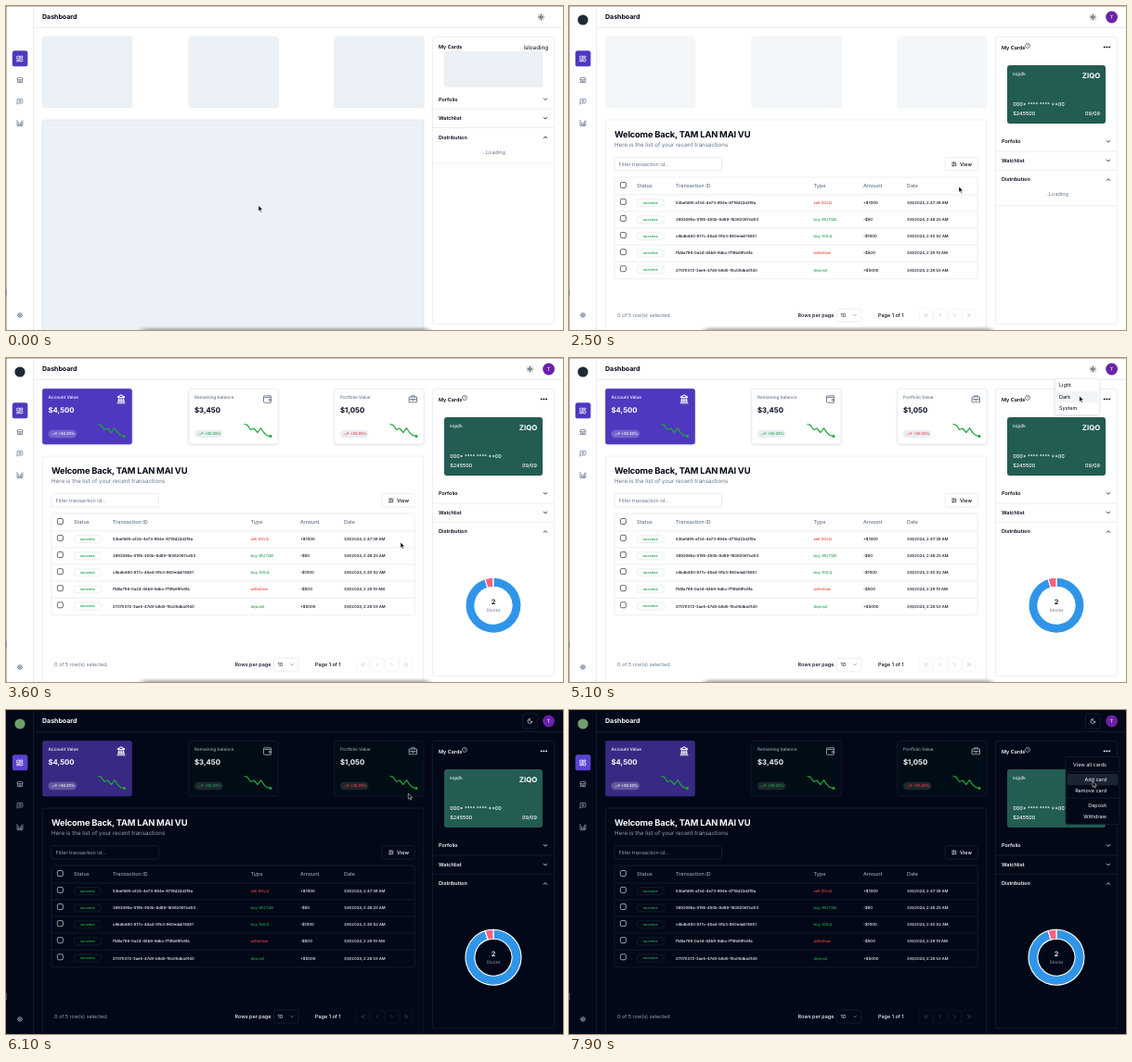
Animation of 600 by 350 pixels, one loop 8000 ms. Source, as an HTML page:

```html
<!DOCTYPE html>
<html lang="en">
<head>
<meta charset="utf-8">
<title>Dashboard</title>
<style>
  html, body { margin: 0; width: 100%; height: 100%; overflow: hidden; }
  svg {
    --bg: #fff; --fg: #020817; --muted: #64748b; --line: #dbe3ec; --hover: #f1f5f9;
    --accent: #5038bf; --tab: #5038bf; --chip: #e9eef3; --logo: #1f2937; --ring: none; --edge: #555; --dock: .6;
    display: block; width: 100vw; height: 100vh; background: var(--bg);
    font-family: Inter, sans-serif; text-rendering: geometricPrecision;
  }
  svg.dark {
    --bg: #020817; --fg: #f8fafc; --muted: #97a2b3; --line: #1c2738; --hover: #1a2433;
    --accent: #382a84; --tab: #5a42d2; --chip: #20262f; --logo: #6f9f6a; --ring: #1e293b; --edge: #111827; --dock: 0;
  }
  text { white-space: pre; }
  #dock { opacity: var(--dock); }
</style>
</head>
<body>
<svg id="stage" viewBox="0 0 600 350"></svg>
<script>
const LOOP = 8000;
const AT = { user: 100, data: 1200, charts: 2800, themeOpen: 4800, dark: 5180, themeClose: 5400, cardMenu: 7200 };
const FG = 'var(--fg)', MUTED = 'var(--muted)', LINE = 'var(--line)', BG = 'var(--bg)';
const GREEN = '#1fa548', RED = '#ef3f3f';

// y is the middle of the capitals
const text = (x, y, size, str, { w = 400, c = FG, a = 'start', ls = 0 } = {}) =>
  `<text x="${x}" y="${y + size * 0.36}" font-size="${size}" font-weight="${w}" fill="${c}" text-anchor="${a}" letter-spacing="${ls}">${str}</text>`;
const box = (x, y, w, h, r, fill = 'none', stroke = 'none', extra = '') =>
  `<rect x="${x}" y="${y}" width="${w}" height="${h}" rx="${r}" fill="${fill}" stroke="${stroke}" stroke-width=".6" ${extra}/>`;
const rule = (x1, y1, x2, y2, c = LINE) =>
  `<path d="M${x1} ${y1}L${x2} ${y2}" stroke="${c}" stroke-width=".6"/>`;
const icon = (name, x, y, size, c = FG, w = 2.3) =>
  `<path d="${ICONS[name]}" transform="translate(${x - size / 2} ${y - size / 2}) scale(${size / 24})" fill="none" stroke="${c}" stroke-width="${w}" stroke-linecap="round" stroke-linejoin="round"/>`;
const group = (id, ...parts) => `<g id="${id}">${parts.join('')}</g>`;

const ICONS = {
  grid: 'M3 3h7v9H3zM14 3h7v5h-7zM14 12h7v9h-7zM3 16h7v5H3z',
  store: 'M3 9l2-5h14l2 5M4 11v9h16v-9M3 9c0 4 6 4 6 0 0 4 6 4 6 0 0 4 6 4 6 0M9 20v-5h6v5',
  message: 'M21 15a2 2 0 0 1-2 2H7l-4 4V5a2 2 0 0 1 2-2h14a2 2 0 0 1 2 2zM12 7v6M9 10h6',
  bars: 'M3 3v18h18V4M8 21V10M13 21V13M17 21V7',
  gear: 'M5 12a7 7 0 1 0 14 0a7 7 0 1 0-14 0M9 12a3 3 0 1 0 6 0a3 3 0 1 0-6 0M12 2v3M12 19v3M2 12h3M19 12h3M5 5l2 2M17 17l2 2M5 19l2-2M17 7l2-2',
  sun: 'M8 12a4 4 0 1 0 8 0a4 4 0 1 0-8 0M12 2v2M12 20v2M4.9 4.9l1.4 1.4M17.7 17.7l1.4 1.4M2 12h2M20 12h2M6.3 17.7l-1.4 1.4M19.1 4.9l-1.4 1.4',
  moon: 'M12 3a6 6 0 0 0 9 9 9 9 0 1 1-9-9Z',
  bank: 'M3 22h18M4 18h16M6 17v-6M10 17v-6M14 17v-6M18 17v-6M12 2l8 5v1H4V7z',
  wallet: 'M21 8V5a1 1 0 0 0-1-1H5a2 2 0 0 0 0 4h16v12a1 1 0 0 1-1 1H5a2 2 0 0 1-2-2V6M17 13h4v3h-4z',
  briefcase: 'M3 7h18v13H3zM8 7V4h8v3M3 13h18M10 13v2h4v-2',
  trend: 'M22 7l-8.5 8.5-5-5L2 17M16 7h6v6',
  sliders: 'M3 5h7M14 5h7M3 12h11M18 12h3M3 19h5M12 19h9M10 3v4M18 10v4M8 17v4',
  down: 'M6 9l6 6 6-6', up: 'M6 15l6-6 6 6', left: 'M15 6l-6 6 6 6', right: 'M9 6l6 6-6 6',
  first: 'M11 6l-6 6 6 6M18 6l-6 6 6 6', last: 'M6 6l6 6-6 6M13 6l6 6-6 6',
};

const CARD_X = [39, 196.5, 353.5];
const SPARK = [[60, 71.5], [63.5, 72.3], [67, 77.5], [70.5, 76], [74.5, 80.5], [78, 75.7], [81, 80.2], [84.5, 83.6], [88.5, 84.4]];
const [SPARK_END_X, SPARK_END_Y] = SPARK.at(-1);
const STATS = [
  ['Account Value', '$4,500', 'bank', '#fff', '#fff'],
  ['Remaining balance', '$3,450', 'wallet', FG, GREEN],
  ['Portfolio Value', '$1,050', 'briefcase', FG, RED],
];
const ROWS = [
  ['53befd95-af34-4e73-994e-8719d22d2f9a', 'sell XOLQ', RED, '+$1000', '2:47:39'],
  ['3892065a-5195-450b-8d89-16362067cd03', 'buy WUTQB', GREEN, '-$50', '2:46:25'],
  ['c8bdb460-817c-48a4-91b3-980eda515851', 'buy XOLQ', GREEN, '-$1000', '2:40:52'],
  ['ffd6a798-0a24-48b9-8dbc-ff19b99fc6fa', 'withdraw', RED, '-$500', '2:29:19'],
  ['27070372-3ae5-47d0-b9d5-f8c05dba0140', 'deposit', GREEN, '+$5000', '2:28:53'],
];

const sidebar = () =>
  rule(29.5, 0, 29.5, 350) + rule(30, 23.5, 600, 23.5) +
  box(6.8, 48.3, 16.6, 17, 2.6, 'var(--tab)') + icon('grid', 15, 57, 7.6, '#fff') +
  icon('store', 15, 80, 7.8, MUTED) + icon('message', 15, 103.3, 7.8, MUTED) +
  icon('bars', 15, 126.3, 7.8, MUTED) + icon('gear', 15, 334, 7, MUTED);

const header = () =>
  text(39, 11.6, 7.03, 'Dashboard', { w: 700 }) +
  group('themeButton', box(556.4, 4, 16, 16, 2.4, 'none', 'var(--ring)'),
    group('sun', icon('sun', 564.4, 12, 7.2, FG, 2.6)), group('moon', icon('moon', 564.4, 12, 6.6))) +
  group('user', '<circle cx="15" cy="15" r="5.6" fill="var(--logo)"/>',
    '<circle cx="584.6" cy="12" r="6.4" fill="#6b21a8"/>', text(584.6, 12, 5.6, 'T', { c: '#fff', a: 'middle' }));

const skeletons = () =>
  group('cardSkeletons', ...CARD_X.map(x => box(x, 33, 97, 77, 3, '#ebf1f6', '#e6edf3'))) +
  group('tableSkeleton', box(39, 123, 411, 240, 2.5, '#ebf1f6', '#d3dde6'));

const statCard = ([title, value, name, color, tone], i) => {
  const x = CARD_X[i], first = i === 0;
  return box(x + .3, 33.3, 96.3, 59.7, 2.6, first ? 'var(--accent)' : BG, first ? 'var(--accent)' : LINE, 'filter="url(#shadow)"') +
    text(x + 6.5, 42.6, 4.69, title, { w: 500, c: first ? color : MUTED }) +
    text(x + 6.5, 56, 7.8, value, { w: 700, c: color }) +
    icon(name, x + 85, 44.3, 10.6, first ? '#fff' : MUTED, first ? 2.6 : 2) +
    box(x + 6.5, 77.8, 30.5, 8.4, 4.2, first ? '#ffffff38' : 'var(--chip)') +
    icon('trend', x + 13, 82, 5.4, tone) + text(x + 17.4, 82, 3.9, '+30.23%', { w: 600, c: tone }) +
    `<path class="spark" data-x="${x}" fill="none" stroke="#22a33a" stroke-width="1.2" stroke-linejoin="round"/>` +
    `<circle class="dot" cx="${x + SPARK_END_X}" r="1.5" fill="#22a33a"/>`;
};

const checkbox = y => box(55.4, y - 3.3, 6, 6, 1.4, 'none', FG);
const tableRow = ([id, type, tone, amount, time], i) => {
  const y = 212.6 + i * 18.1, cell = { w: 500 };
  return rule(49, y - 8.8, 440, y - 8.8) + checkbox(y - .9) +
    box(73, y - 4, 29.6, 8, 4, 'none', LINE) + text(87.8, y, 3.9, 'success', { w: 600, c: GREEN, a: 'middle' }) +
    text(115, y, 4.2, id, cell) + text(263.5, y, 4.2, type, { w: 500, c: tone }) +
    text(317, y, 4.3, amount, cell) + text(364, y, 4.2, `3/6/2024, ${time} AM`, cell);
};
const pageButton = (name, x) =>
  `<g opacity=".5">${box(x - 7, 327, 14, 14, 2, 'none', LINE)}${icon(name, x, 334, 6.4, MUTED)}</g>`;
const table = () => group('table',
  group('tableBody',
    box(39.4, 123, 410.4, 280, 2.5, BG, LINE),
    text(49, 138.3, 9.375, 'Welcome Back, TAM LAN MAI VU', { w: 700, ls: -.2 }),
    text(49, 149.3, 6.2, 'Here is the list of your recent transactions', { c: MUTED }),
    box(49, 163.5, 115.5, 14.4, 2.2, 'none', LINE), text(53.5, 171, 5.47, 'Filter transaction id...', { c: MUTED }),
    box(405, 163.5, 35.2, 14.4, 2.2, 'none', LINE), icon('sliders', 414.8, 170.8, 6), text(421, 171, 5.47, 'View', { w: 500 }),
    box(49, 185, 391.2, 109.8, 2.2, 'none', LINE), checkbox(193.8),
    ...[[73, 'Status'], [115, 'Transaction ID'], [263.5, 'Type'], [317, 'Amount'], [364, 'Date']]
      .map(([x, label]) => text(x, 194.5, 5.47, label, { w: 500, c: MUTED })),
    ...ROWS.map(tableRow)),
  group('pager',
    text(52, 334, 5.47, '0 of 5 row(s) selected.', { c: MUTED }),
    text(246.5, 334, 5.47, 'Rows per page', { w: 500 }),
    box(288.5, 327, 26.5, 14, 2.2, 'none', LINE), text(292.5, 334, 5.47, '10'), icon('down', 308, 334, 6, MUTED),
    text(333, 334, 5.47, 'Page 1 of 1', { w: 500 }),
    pageButton('first', 384.6), pageButton('left', 400), pageButton('right', 415.6), pageButton('last', 431)));

const section = (label, y, arrow) => text(466, y, 5.47, label, { w: 600 }) + icon(arrow, 581, y, 6.8, FG, 2.8);
const panel = () =>
  box(459.4, 33.6, 131.4, 310, 2.4, BG, LINE) +
  group('cardLoading', text(466, 44.4, 5.47, 'My Cards', { w: 600 }), text(584, 44.4, 6.25, 'isloading', { a: 'end' }),
    '<g id="panelSkeleton">' + box(472, 49, 106, 38.5, 3, '#ebf1f6', '#e6edf3') + '</g>') +
  group('bankCard', text(466, 45.4, 5.47, 'My Cards', { w: 600 }),
    `<circle cx="494" cy="43" r="2.5" fill="none" stroke="${FG}" stroke-width=".5"/>`, text(494, 43, 3.4, '1', { a: 'middle' }),
    ...[-2.7, 0, 2.7].map(d => `<circle cx="${579.4 + d}" cy="44.4" r=".95" fill="${FG}"/>`),
    box(472, 64, 106, 63, 3, '#235b52', 'none', 'filter="url(#shadow)"'),
    text(478.3, 73, 4.69, 'kqjqfk', { c: '#fff' }), text(572.3, 75.6, 7.8, 'ZIQO', { w: 700, c: '#fff', a: 'end' }),
    text(478.3, 106, 5.47, '000* **** **** **00', { w: 500, c: '#fff' }),
    text(478.3, 116.5, 5.47, '$245500', { w: 500, c: '#fff' }), text(572, 116.5, 5.47, '09/09', { w: 500, c: '#fff', a: 'end' })) +
  group('sections', section('Porfolio', 100.7, 'down'), rule(459.4, 111.3, 590.6, 111.3),
    section('Watchlist', 121.3, 'down'), rule(459.4, 131.5, 590.6, 131.5), section('Distribution', 141.8, 'up'),
    group('chartLoading', text(525, 157.8, 5.47, '...Loading', { c: MUTED, a: 'middle' }), rule(459.4, 170, 590.6, 170))) +
  group('donut', '<path id="blue" fill="#3095e8" stroke="#fff" stroke-width="1.1"/><path id="red" fill="#f8637f" stroke="#fff" stroke-width="1.1"/>',
    text(525, 263.8, 7.4, '2', { w: 600, a: 'middle' }), text(525, 272.2, 4.69, 'Stocks', { c: MUTED, a: 'middle' }));

const menus = () =>
  group('themeMenu', box(523.5, 22.6, 47.8, 38.8, 2.2, BG, LINE, 'filter="url(#shadow)"'),
    box(525.4, 36, 44, 12.2, 1.4, 'var(--hover)', 'none', 'id="themeHover"'),
    ...['Light', 'Dark', 'System'].map((s, i) => text(528, 29.4 + i * 12.4, 5.47, s))) +
  group('cardMenu', box(535, 50.6, 58, 73, 2.2, BG, LINE),
    box(536.6, 69, 54.8, 12.2, 1.4, 'var(--hover)', 'none', 'id="cardHover"'),
    rule(535, 66.7, 593, 66.7), rule(535, 95.2, 593, 95.2),
    ...[['View all cards', 58.8], ['Add card', 75], ['Remove card', 87.2], ['Deposit', 103], ['Withdraw', 115.2]]
      .map(([s, y]) => text(579, y, 5.47, s, { a: 'end' })));

const stage = document.getElementById('stage');
stage.innerHTML = `<defs>
  <filter id="shadow" x="-10%" y="-10%" width="120%" height="130%"><feDropShadow dx="0" dy=".7" stdDeviation=".9" flood-opacity=".14"/></filter>
  <filter id="soft" x="-10%" y="-200%" width="120%" height="500%"><feGaussianBlur stdDeviation="3 1.6"/></filter></defs>` +
  sidebar() + header() + skeletons() + group('stats', ...STATS.map(statCard)) + table() + panel() +
  box(146, 348, 310, 6, 3, '#777', 'none', 'id="dock" filter="url(#soft)"') +
  rule(.2, 0, .2, 350, 'var(--edge)') + rule(0, .1, 600, .1, 'var(--edge)') + rule(.3, 306, .3, 313, MUTED) + menus() +
  '<path id="cursor" d="M0 0v6.2l1.4-1.2 1 2.2 1-.4-1-2.2h2z" fill="#000" stroke="#fff" stroke-width=".5"/>';

const $ = id => document.getElementById(id);
const show = (id, on) => { $(id).style.display = on ? '' : 'none'; };
const move = (id, x, y) => $(id).setAttribute('transform', `translate(${x} ${y})`);
const smooth = (t, a, b) => { const p = Math.min(1, Math.max(0, (t - a) / (b - a))); return p * p * (3 - 2 * p); };

const CURSOR = [[2150, 272, 215.5], [2500, 420, 195], [3600, 425, 199], [4000, 505, 90], [4300, 565, 13], [4800, 565, 13],
  [5100, 549.8, 41], [5550, 549.8, 41], [6100, 433.3, 90], [6450, 433.3, 90], [7050, 578.5, 43], [7400, 578.5, 43], [7850, 564, 77]];
function cursorAt(t) {
  const i = CURSOR.findIndex(k => k[0] > t);
  if (i === 0) return CURSOR[0].slice(1);
  if (i < 0) return CURSOR.at(-1).slice(1);
  const [a, x0, y0] = CURSOR[i - 1], [b, x1, y1] = CURSOR[i], p = smooth(t, a, b);
  return [x0 + (x1 - x0) * p, y0 + (y1 - y0) * p];
}

function ringSlice(from, to, outer = 30, inner = 20) {
  const at = (r, turn) => `${525 + r * Math.sin(turn * 2 * Math.PI)} ${267.2 - r * Math.cos(turn * 2 * Math.PI)}`;
  const large = to - from > .5 ? 1 : 0;
  return `M${at(outer, from)}A${outer} ${outer} 0 ${large} 1 ${at(outer, to)}L${at(inner, to)}A${inner} ${inner} 0 ${large} 0 ${at(inner, from)}Z`;
}

function drawCharts(t) {
  const p = Math.min(1, Math.max(0, (t - AT.charts) / 1000)), grow = 1 - (1 - p) ** 4;
  $('blue').setAttribute('d', ringSlice(0, .952 * grow));
  $('red').setAttribute('d', ringSlice(.952 * grow, .9999 * grow));
  const rise = y => 88 + (y - 88) * grow;
  document.querySelectorAll('.spark').forEach(el =>
    el.setAttribute('d', 'M' + SPARK.map(([x, y]) => `${x + +el.dataset.x} ${rise(y)}`).join('L')));
  document.querySelectorAll('.dot').forEach(el => el.setAttribute('cy', rise(SPARK_END_Y)));
}

function render(t) {
  const user = t >= AT.user, data = t >= AT.data, charts = t >= AT.charts, dark = t >= AT.dark;
  stage.classList.toggle('dark', dark);
  show('user', user);
  move('themeButton', user ? 0 : 12, 0);
  show('sun', !dark); show('moon', dark);

  const pulse = 1 - .5 * (smooth(t, 0, 500) - smooth(t, 1100, 1800) + smooth(t, 2200, 2500));
  for (const id of ['cardSkeletons', 'tableSkeleton', 'panelSkeleton']) $(id).style.opacity = pulse;
  show('cardSkeletons', !charts); show('tableSkeleton', !data);
  show('cardLoading', !data); show('bankCard', data); show('table', data);
  move('sections', 0, data ? 45.7 : 0);
  show('chartLoading', !charts); show('donut', charts); show('stats', charts);
  move('tableBody', 0, charts ? -17 : 0);
  move('pager', 0, charts ? -2.8 : 0);
  if (charts) drawCharts(t);

  const [x, y] = cursorAt(t);
  move('cursor', x, y);
  show('themeMenu', t >= AT.themeOpen && t < AT.themeClose);
  show('themeHover', y > 35);
  show('cardMenu', t >= AT.cardMenu);
  show('cardHover', y > 52);
  $('cardHover').setAttribute('y', y < 68 ? 52.7 : 69);
}

const start = performance.now();
function tick() {
  render((performance.now() - start) % LOOP);
  requestAnimationFrame(tick);
}
tick();
</script>
</body>
</html>
```
